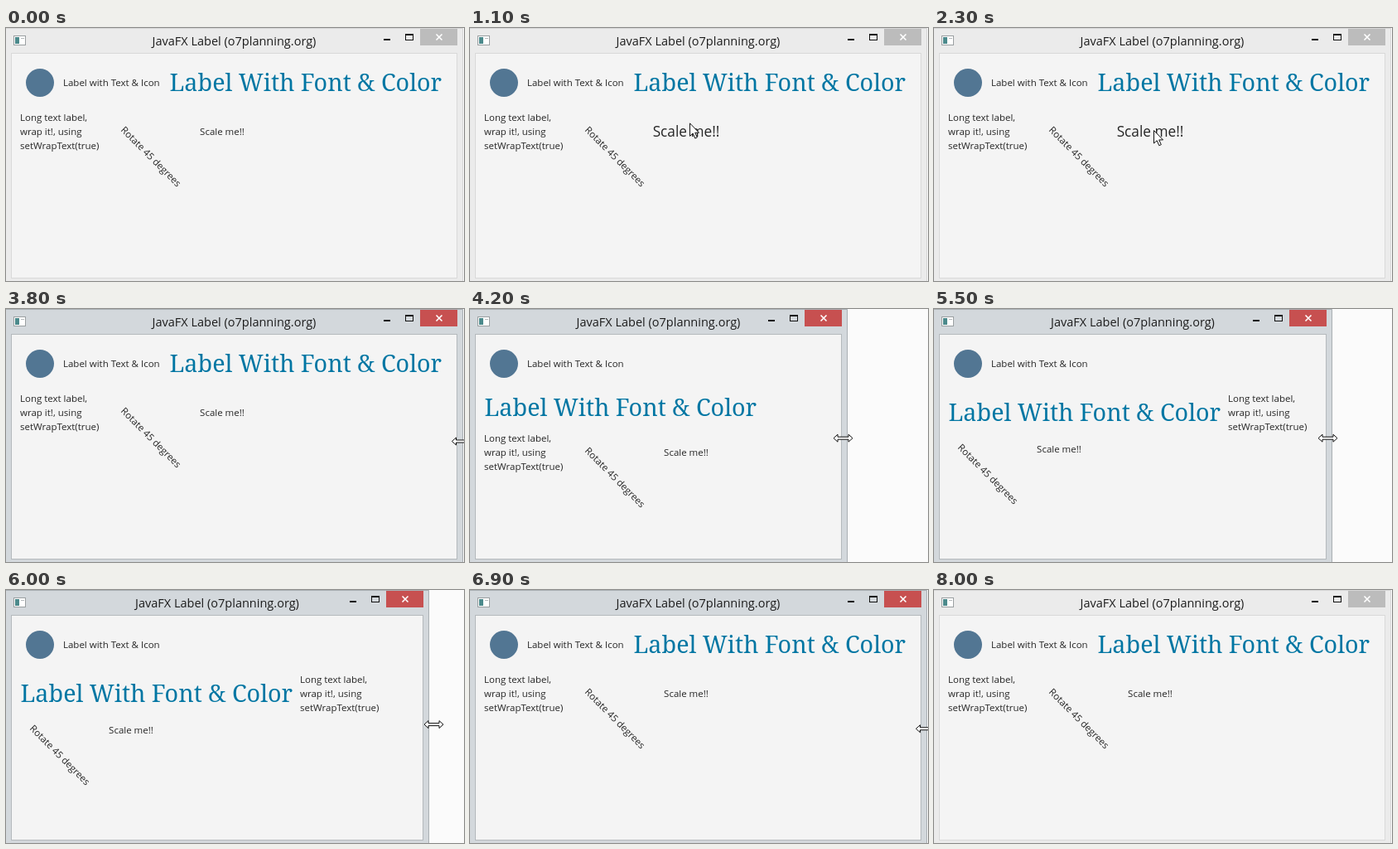
These frames come from a looping animation (553x305 px, 8.1 s). An HTML page:

```html
<!DOCTYPE html>
<html lang="en">
<head>
<meta charset="utf-8">
<title>Label demo</title>
<style>
  html, body { margin: 0; width: 100%; height: 100%; overflow: hidden; background: #fbfbfb; }
  svg { display: block; width: 553px; height: 305px; }
  text { font-family: "Open Sans", "Noto Sans", sans-serif; font-size: 11.5px; fill: #262626; white-space: pre; }
  #title { font-size: 14.5px; fill: #1c1c1c; text-anchor: middle; }
  #heading text { font-family: "Noto Serif", serif; font-size: 28.7px; fill: #0076a3; }
  .centered { text-anchor: middle; }
  .cursor { fill: #fff; stroke: #111; stroke-width: 1; }
</style>
</head>
<body>
<svg viewBox="0 0 553 305">
  <rect id="frame" x="-1" y="0" height="320"/>
  <path id="edge" fill="none"/>
  <rect id="panel" x="6.5" y="30.5" height="271" fill="#f4f4f4"/>

  <g id="appIcon">
    <rect x="9.5" y="9.5" width="14" height="11" fill="#fff" stroke="#9a9fa1"/>
    <rect x="11" y="11" width="5" height="8" fill="#4c8a8c"/>
    <path d="M18 12.500h4" stroke="#b5babc"/>
  </g>
  <text id="title" y="21">JavaFX Label (o7planning.org)</text>

  <g id="buttons">
    <rect x="-96" y="13" width="8" height="2" fill="#111"/>
    <path d="M-70 7h10v8h-10zM-69 9v5h8v-5z" fill="#111" fill-rule="evenodd"/>
    <rect id="close" x="-52" y="1" width="45" height="20"/>
    <path d="M-32.500 7.500l7 7m0 -7l-7 7" stroke="#fff" stroke-width="1.6"/>
  </g>

  <g id="iconLabel">
    <circle cx="24" r="17" fill="#527693"/>
    <text x="52" y="4">Label with Text &amp; Icon</text>
  </g>
  <g id="heading"><text x=".5" y="10">Label With Font &amp; Color</text></g>
  <g id="wrapped">
    <text y="-13">Long text label,</text>
    <text y="4">wrap it!, using</text>
    <text y="21">setWrapText(true)</text>
  </g>
  <g id="rotated"><text class="centered" y="4" transform="translate(48 30) rotate(45)">Rotate 45 degrees</text></g>
  <g id="scaled"><text id="scaleText" class="centered" y="4">Scale me!!</text></g>

  <path id="arrow" class="cursor" d="M.5 .5V16l3.700-3.300 2.600 6 2.500-1.100-2.600-5.700H11.500z"/>
  <path id="resizer" class="cursor" d="M-11.500 0l5-4.500v3h13v-3l5 4.500-5 4.500v-3h-13v3z"/>
</svg>
<script>
const LOOP = 8100;
const STEP = 100;
const FULL_WIDTH = 552;
const PAD = 17;
const GAP = 10;
const ITEMS = [
  { id: "iconLabel", w: 170, h: 49 },
  { id: "heading", w: 328, h: 38 },
  { id: "wrapped", w: 100, h: 50 },
  { id: "rotated", w: 97, h: 18 },
  { id: "scaled", w: 54, h: 18 }
];

const $ = id => document.getElementById(id);
const progress = (t, from, to) => Math.min(1, Math.max(0, (t - from) / (to - from)));
const smooth = u => u * u * (3 - 2 * u);
const lerp = (a, b, u) => a + (b - a) * u;

const set = (id, attrs) => {
  for (const name in attrs) $(id).setAttribute(name, attrs[name]);
};
const move = (id, x, y) => set(id, { transform: `translate(${x} ${y})` });
const show = (id, visible) => set(id, { visibility: visible ? "visible" : "hidden" });

// The window edge is dragged inwards and back out, twice.
function windowWidth(t) {
  const first = smooth(progress(t, 3900, 4400)) - smooth(progress(t, 4600, 5000));
  const second = smooth(progress(t, 5100, 5700)) - smooth(progress(t, 5700, 6250));
  return Math.round(FULL_WIDTH - 148 * first - 96 * second);
}

// Glide in, settle on the label, swing below it and back, then leave to the right.
function arrowPosition(t) {
  const enter = 1 - (1 - progress(t, 200, 1000)) ** 2;
  const leave = progress(t, 2400, 3200) ** 2;
  const swing = Math.sin(Math.PI * progress(t, 1500, 2300));
  const rest = 110 + 13 * progress(t, 1000, 1300) + 49 * swing;
  return [
    lerp(lerp(543, 265, enter), 550, leave),
    lerp(lerp(38 - 110, 0, enter) + rest, 160, leave)
  ];
}

// The resize cursor runs slightly ahead of the edge it drags.
function resizerPosition(t) {
  const direction = Math.sign(windowWidth(t + 50) - windowWidth(t - 50));
  const drift = Math.sin(Math.PI * Math.max(0, t - 3900) / 1900);
  return [windowWidth(t) + (direction * 5.5 || -2), 159.5 - 8 * drift];
}

// Left to right, wrapping to a new row; items are centred vertically in their row.
function flow(items, right) {
  const rows = [];
  let x = Infinity;
  for (const item of items) {
    if (x + item.w > right) {
      rows.push([]);
      x = PAD;
    }
    rows[rows.length - 1].push({ id: item.id, x, h: item.h });
    x += item.w + GAP;
  }
  const places = {};
  let top = 41;
  for (const row of rows) {
    const height = Math.max(...row.map(item => item.h));
    for (const item of row) places[item.id] = [item.x, Math.round(top + height / 2)];
    top += height + GAP;
  }
  return places;
}

function drawWindow(width, active) {
  set("frame", { width: width + 1, fill: active ? "#d3d8dc" : "#ebebeb" });
  set("edge", { d: `M0 .5H${width - 0.5}V306`, stroke: active ? "#a9afb3" : "#d6d6d6" });
  set("panel", { width: width - 14, stroke: active ? "#b4b9bc" : "#d9d9d9" });
  set("close", { fill: active ? "#c75050" : "#bcbcbc" });
  set("title", { x: width / 2 - 0.5 });
  move("buttons", width, 0);
}

function draw(time) {
  const t = Math.floor((time % LOOP) / STEP) * STEP;
  const width = windowWidth(t);
  drawWindow(width, t >= 3800 && t < 8000);

  const places = flow(ITEMS, width - PAD);
  for (const id in places) move(id, ...places[id]);

  const pointing = t >= 200 && t < 3200;
  const [x, y] = arrowPosition(t);
  const [labelX, labelY] = places.scaled;
  const hovered = pointing && Math.abs(x - labelX - 27) < 41 && Math.abs(y - labelY) < 13.5;
  set("scaleText", { transform: `translate(27 0) scale(${hovered ? 1.5 : 1})` });

  show("arrow", pointing);
  move("arrow", x, y);
  show("resizer", t >= 3400 && t < 7600);
  move("resizer", ...resizerPosition(t));
}

const start = performance.now();
function tick() {
  draw(performance.now() - start);
  requestAnimationFrame(tick);
}
tick();
</script>
</body>
</html>
```
